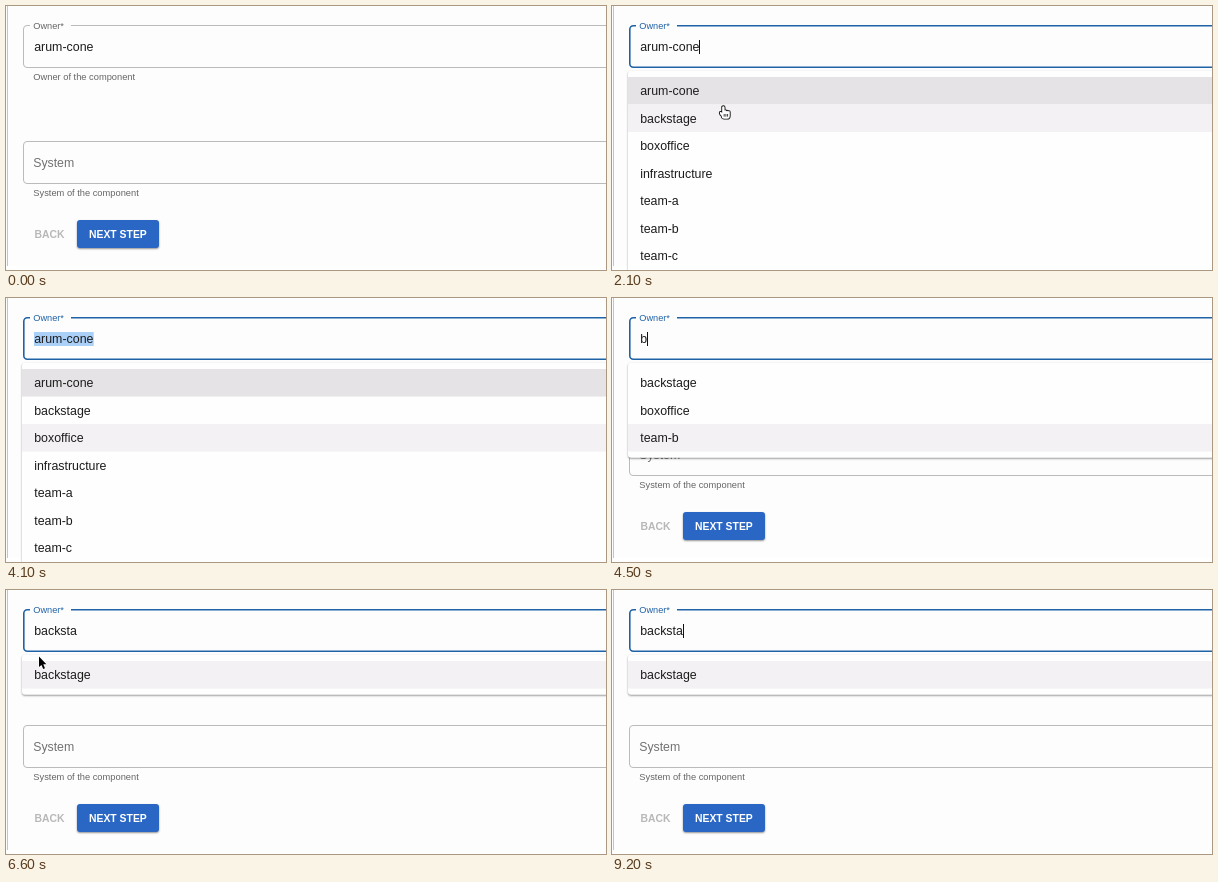
Write an HTML page with a canvas that moves like this. It is 600 px wide and 264 px high and loops after 9300 ms.

```html
<!DOCTYPE html>
<html lang="en">
<head>
<meta charset="utf-8">
<title>Owner picker</title>
<style>
html, body { margin: 0; width: 100%; height: 100%; overflow: hidden; background: #fff; }
canvas { display: block; width: 600px; height: 264px; }
</style>
</head>
<body>
<canvas id="stage" width="600" height="264"></canvas>
<script>
const ctx = document.getElementById('stage').getContext('2d');
const LOOP = 9300, STEP = 100;
const FACE = '"Liberation Sans", Arial, sans-serif';
const PAGE = '#fefdfe', INK = '#1d1c1d', GREY = '#666566', LINE = '#bcbbbc', BLUE = '#1f62a6';
const OWNER = 'arum-cone', QUERY = 'backsta';
const OPTIONS = [OWNER, 'backstage', 'boxoffice', 'infrastructure',
  ...['a', 'b', 'c'].map(s => 'team-' + s)];
const ROW_TOP = 71, ROW_H = 27.5, PAD = 6.2, FIELD_H = 42;
const OWNER_Y = 19.5, SYSTEM_Y = 135.5;

// Moments of the story, in ms
const ENTER = 100, FOCUS = 1800, SELECT = 3500, TYPE = 4500, RESUME = 4900, TYPED = 5100,
  SETTLE = 6100, LEAVE = 8200, GONE = 8700;

// Pointer moves: start, end and destination
const MOVES = [
  { from: ENTER, to: 1000, x: 135, y: 150 },
  { from: 1000, to: 1400, x: 121, y: 47 },
  { from: FOCUS, to: 2700, x: 85, y: 250 },
  { from: 3000, to: SELECT, x: 106, y: 250 },
  { from: 3800, to: 4100, x: 640, y: 140 },
  { from: 5500, to: 6200, x: 33, y: 66.5 },
  { from: LEAVE, to: GONE, x: 333, y: 226 }
];

const inside = (v, a, b) => v >= a && v < b;
const clamp = (v, a, b) => Math.min(b, Math.max(a, v));
const ease = u => u * u * (3 - 2 * u);

function pointerAt(t) {
  let x = 330, y = 217;
  for (const m of MOVES) {
    const u = ease(clamp((t - m.from) / (m.to - m.from), 0, 1));
    x += (m.x - x) * u;
    y += (m.y - y) * u;
  }
  return { x, y };
}

function valueAt(t) {
  if (t < TYPE) return OWNER;
  const count = t < RESUME
    ? Math.min(3, 1 + (t - TYPE) / 100)
    : 4 + 3 * Math.min(1, (t - RESUME) / (TYPED - RESUME));
  return QUERY.slice(0, Math.floor(count));
}

function caretOn(t) {
  if (t < FOCUS || inside(t, SELECT, TYPE)) return false;
  if (inside(t, TYPE, TYPED)) return true;
  const since = t - (t < TYPE ? FOCUS : TYPED);
  return Math.floor(since / 500) % 2 === 0;
}

function text(str, x, y, size, color, weight = 'normal') {
  ctx.font = `${weight} ${size}px ${FACE}`;
  ctx.fillStyle = color;
  ctx.fillText(str, x, y);
}

function box(x, y, w, h, r, color, shadow) {
  ctx.save();
  ctx.shadowColor = shadow;
  ctx.shadowBlur = 2;
  ctx.shadowOffsetY = 1;
  ctx.fillStyle = color;
  ctx.beginPath();
  ctx.roundRect(x, y, w, h, r);
  ctx.fill();
  ctx.restore();
}

// Thicker outlines grow inward
function outline(y, color, width, notch) {
  const inset = (width - 1) / 2, right = 610, r = 3.5;
  const left = 17.5 + inset, top = y + inset, bottom = y + FIELD_H - inset;
  ctx.strokeStyle = color;
  ctx.lineWidth = width;
  ctx.beginPath();
  ctx.moveTo(right, bottom);
  ctx.arcTo(left, bottom, left, top, r);
  ctx.arcTo(left, top, right, top, r);
  if (notch) {
    ctx.lineTo(24, top);
    ctx.moveTo(65, top);
  }
  ctx.lineTo(right, top);
  ctx.stroke();
}

function paint(path, fill, edge, width) {
  ctx.lineJoin = 'round';
  ctx.strokeStyle = edge;
  ctx.lineWidth = width;
  ctx.stroke(path);
  ctx.fillStyle = fill;
  ctx.fill(path);
}

function arrow() {
  paint(new Path2D('M0 0V10.5L2.5 8.4L4.2 12.5L6 11.7L4.3 7.8H7.4Z'), '#000', '#fff', 1.4);
}

function hand() {
  const path = new Path2D(), creases = new Path2D();
  path.roundRect(-2, 6.5, 8, 6.5, 2.5);
  path.roundRect(-1.5, 0.5, 2.4, 9, 1.2);
  path.ellipse(-2.2, 8.4, 1.2, 2.4, -0.6, 0, 2 * Math.PI);
  for (let i = 0; i < 3; i++) {
    path.roundRect(0.7 + 1.8 * i, 4.6 + 0.4 * i, 1.8, 6, 0.9);
    creases.moveTo(0.5 + 1.7 * i, 8.4);
    creases.lineTo(0.5 + 1.7 * i, 11);
  }
  paint(path, '#fff', '#111', 1.8);
  ctx.lineWidth = 0.8;
  ctx.stroke(creases);
}

function beam() {
  const path = new Path2D();
  for (const s of [-1, 1]) {
    path.moveTo(-3, 6.2 * s);
    path.quadraticCurveTo(0, 6.2 * s, 0, 4.5 * s);
    path.quadraticCurveTo(0, 6.2 * s, 3, 6.2 * s);
  }
  path.moveTo(0, -5);
  path.lineTo(0, 5);
  path.moveTo(-1.5, 2);
  path.lineTo(1.5, 2);
  for (const [color, width] of [['#fff', 2.4], ['#111', 1.1]]) {
    ctx.strokeStyle = color;
    ctx.lineWidth = width;
    ctx.stroke(path);
  }
}

function menu(items, chosen, hover) {
  box(16, ROW_TOP - PAD, 600, items.length * ROW_H + 2 * PAD, 3, '#fefefe', 'rgba(0,0,0,.42)');
  items.forEach((name, i) => {
    const y = ROW_TOP + i * ROW_H;
    if (i === chosen || i === hover) {
      ctx.fillStyle = i === chosen ? '#e5e3e5' : '#f3f1f3';
      ctx.fillRect(16, y, 584, ROW_H);
    }
    text(name, 28.2, y + 18.3, 12.4, INK);
  });
}

function ownerField(t, focused, hovered) {
  const value = valueAt(t);
  outline(OWNER_Y, focused ? BLUE : hovered ? INK : LINE, focused ? 1.6 : 1, true);
  text('Owner*', 27.3, 23, 9.2, focused ? BLUE : GREY);
  ctx.font = `12.4px ${FACE}`;
  const w = ctx.measureText(value).width;
  if (inside(t, SELECT, TYPE)) {
    ctx.fillStyle = '#abd0f8';
    ctx.fillRect(28, 34, w + 0.5, 14);
  }
  text(value, 28.2, 45.4, 12.4, INK);
  if (caretOn(t)) {
    ctx.fillStyle = '#111';
    ctx.fillRect(Math.round(28.2 + w), 34, 1, 14);
  }
}

function form(focused, systemHovered) {
  ctx.fillStyle = '#fff';
  ctx.fillRect(0, 0, 600, 264);
  ctx.fillStyle = PAGE;
  ctx.fillRect(0, 0, 600, 260);
  ctx.fillStyle = '#c5c4c6';
  ctx.fillRect(1, 0, 1, 260);

  if (!focused) text('Owner of the component', 27.3, 74, 9.3, GREY);
  outline(SYSTEM_Y, systemHovered ? INK : LINE, 1);
  text('System', 27.2, 161, 12.3, '#727172');
  text('System of the component', 27.3, 190, 9.3, GREY);
  text('BACK', 28.6, 232, 10.4, '#b9b8b9', 'bold');
  box(71, 214, 82, 28, 3, '#2a67c4', 'rgba(0,0,0,.42)');
  text('NEXT STEP', 83, 232, 10.4, '#fff', 'bold');
}

function draw(t) {
  const focused = t >= FOCUS, leaving = t >= LEAVE;
  const p = pointerAt(t);
  const items = t < TYPE ? OPTIONS : OPTIONS.filter(o => o.includes(valueAt(t)));
  const menuEnd = focused ? ROW_TOP + items.length * ROW_H + PAD : 0;
  const row = Math.floor((p.y - ROW_TOP) / ROW_H);
  const overOwner = inside(p.y, OWNER_Y, OWNER_Y + FIELD_H);
  const overSystem = !leaving && p.y > menuEnd && inside(p.y, SYSTEM_Y, SYSTEM_Y + FIELD_H);
  const overRow = focused && !leaving && inside(row, 0, items.length);

  form(focused, overSystem);
  // The last highlighted option stays lit after the pointer leaves
  if (focused) menu(items, items.indexOf(OWNER), t >= SETTLE ? 0 : row);
  ownerField(t, focused, overOwner);

  if (!inside(t, ENTER, GONE)) return;
  ctx.save();
  ctx.translate(p.x, p.y);
  if (overOwner || overSystem) beam();
  else if (overRow) hand();
  else arrow();
  ctx.restore();
}

const start = performance.now();
function tick() {
  const t = (performance.now() - start) % LOOP;
  draw(Math.floor(t / STEP) * STEP);
  requestAnimationFrame(tick);
}
tick();
</script>
</body>
</html>
```
